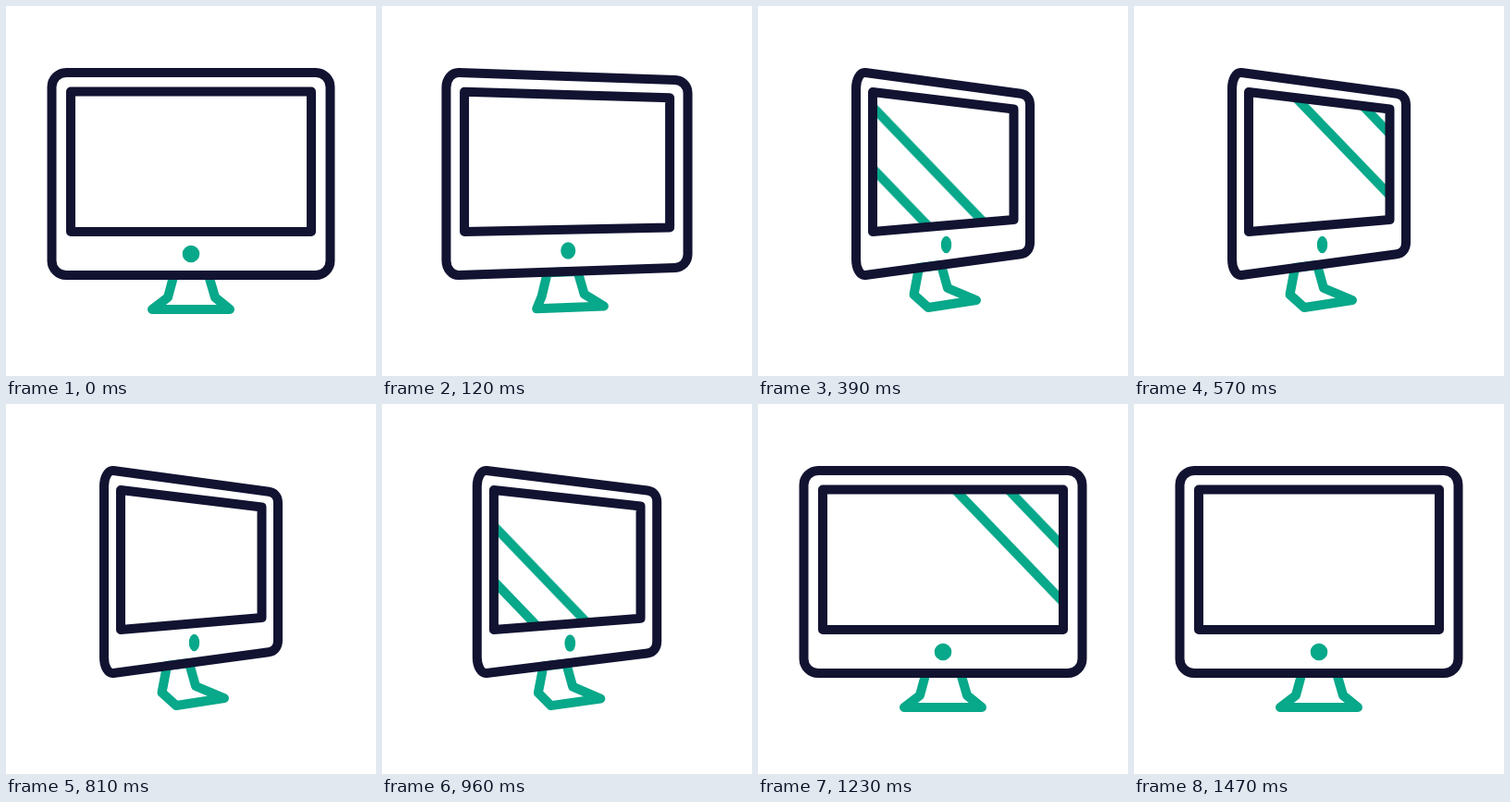
These frames come from a looping animation (400x400 px, 1620 ms). An HTML page without scripts:

```html
<!DOCTYPE html>
<html lang="en">
<head>
<meta charset="utf-8">
<title>Turning monitor</title>
<style>
  :root {
    --loop: 1620ms;
    --navy: #121331;
    --teal: #08a88a;
  }

  html, body {
    margin: 0;
    width: 100%;
    height: 100%;
    overflow: hidden;
    background: #fff;
  }

  svg {
    display: block;
    width: 100%;
    height: 100%;
  }

  .line {
    fill: none;
    stroke: var(--navy);
    stroke-width: 10;
    stroke-linecap: round;
    stroke-linejoin: round;
  }

  .teal { stroke: var(--teal); }

  .turning {
    d: var(--front);
    animation: turn var(--loop) infinite;
  }

  .stand {
    --front: path("M181.5 291L175 315L158 328L242 328L226 315L219 291Z");
    --turned: path("M174 283L168.5 312L184 326L236 318L205 305L198 280Z");
  }

  .case {
    --front: path("M49.5 87.5C49.5 79 56.5 72 65 72L335 72C343.5 72 350.5 79 350.5 87.5L350.5 275.5C350.5 284 343.5 291 335 291L65 291C56.5 291 49.5 284 49.5 275.5Z");
    --turned: path("M106 89C106 79 110.5 71.3 116 72L284 94.8C290 95.6 294 100 294 106.5L294 256C294 262.5 290 267.4 284 268.2L116 291C110.5 291.7 106 284 106 274Z");
  }

  .screen {
    --front: path("M70 92.5L330 92.5L330 244L70 244Z");
    --turned: path("M124 93L276.5 111.5L276.5 231L124 244Z");
  }

  .button {
    --front: path("M190.7 268a9.3 9.3 0 1 0 18.6 0a9.3 9.3 0 1 0 -18.6 0Z");
    --turned: path("M197.8 258a5.7 9.3 0 1 0 11.4 0a5.7 9.3 0 1 0 -11.4 0Z");
    fill: var(--teal);
  }

  .shine { animation: sweep var(--loop) linear infinite; }
  .trail { animation: trail var(--loop) step-end infinite; }

  @keyframes turn {
    0% { d: var(--front); animation-timing-function: cubic-bezier(.45, 0, .55, 1); }
    17.9% { d: var(--turned); }
    56.17% { d: var(--turned); animation-timing-function: cubic-bezier(.45, 0, .55, 1); }
    74.07%, 100% { d: var(--front); }
  }

  /* Two passes of the reflection, each slowing down as it leaves the screen */
  @keyframes sweep {
    0% { transform: translateX(-157px); }
    37.04% { transform: translateX(258px); animation-timing-function: cubic-bezier(.3, .5, .6, 1); }
    48.14% { transform: translateX(340px); animation-timing-function: step-end; }
    48.15% { transform: translateX(-37px); }
    79.63% { transform: translateX(316.6px); animation-timing-function: cubic-bezier(.3, .5, .6, 1); }
    90.74%, 100% { transform: translateX(394px); }
  }

  @keyframes trail {
    0% { transform: translateX(-64px); }
    48.15%, 100% { transform: translateX(-57.5px); }
  }
</style>
</head>
<body>
<svg viewBox="0 0 400 400">
  <clipPath id="glass">
    <path class="screen turning"/>
  </clipPath>

  <path class="stand line teal turning"/>
  <path class="case line turning"/>

  <g clip-path="url(#glass)">
    <g class="shine">
      <path class="line teal" d="M-40 56.4L180 285.2"/>
      <path class="line teal trail" d="M-40 56.4L180 285.2"/>
    </g>
  </g>

  <path class="screen line turning"/>
  <path class="button turning"/>
</svg>
</body>
</html>
```
